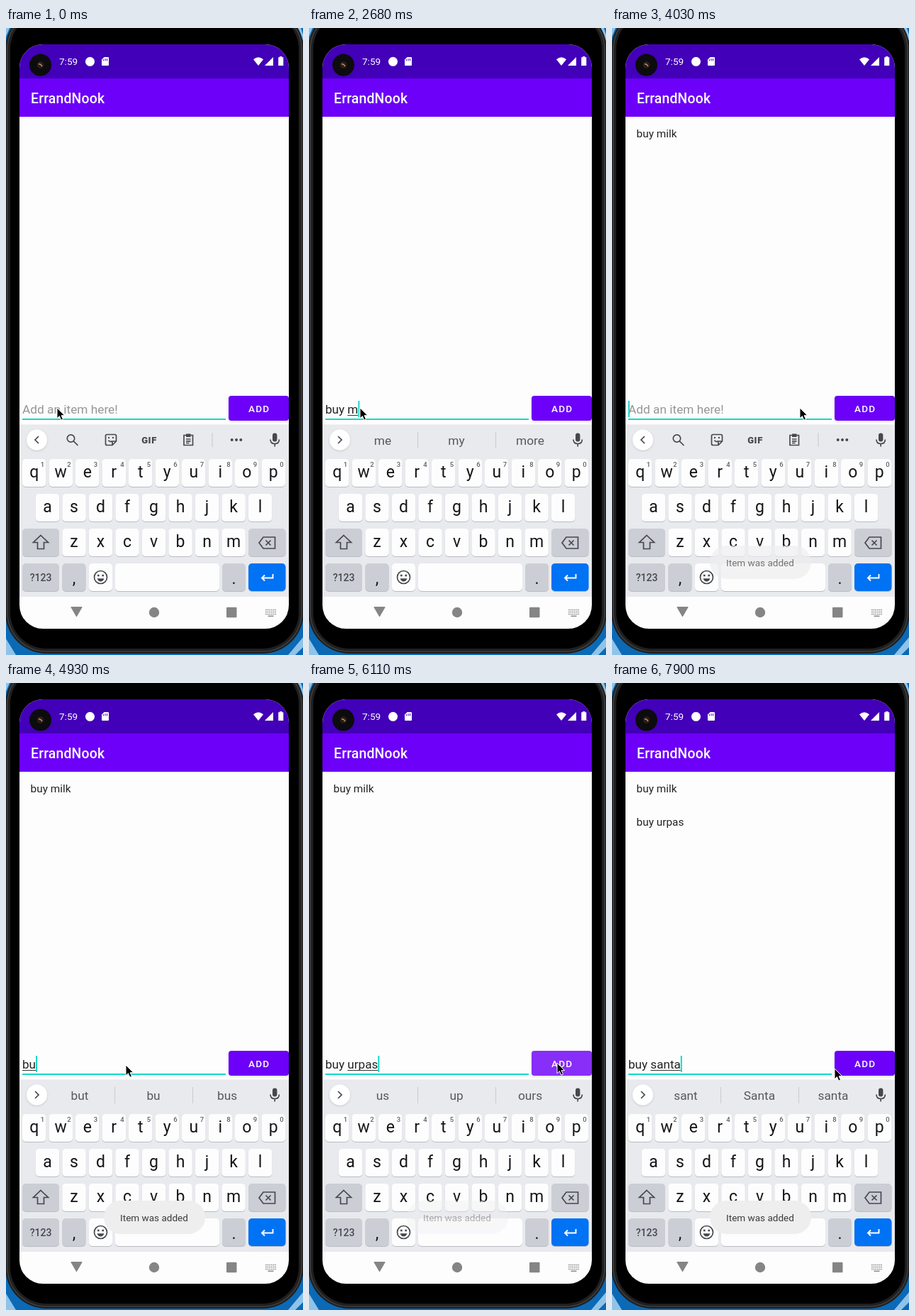
Animation, 419 px wide and 883 px high, one loop 8000 ms. Source, as an HTML page:

```html
<!DOCTYPE html>
<html lang="en">
<head>
<meta charset="utf-8">
<title>To-do list</title>
<style>
  html, body { margin: 0; width: 100%; height: 100%; overflow: hidden; background: #0b69b5; }
  svg { display: block; width: 100%; height: 100%; }
  text { font-family: Roboto, "Noto Sans", sans-serif; white-space: pre; }
  .mid { text-anchor: middle; }
  .title { font-size: 19.35px; font-weight: 500; fill: #fff; }
  .item { font-size: 15.4px; fill: #222; }
  .field { font-size: 17.1px; fill: #222; }
  .hint { font-size: 17.3px; fill: #969696; }
  .small { font-size: 13.55px; }
  .letter { font-size: 23px; fill: #151618; }
  .digit { font-size: 9.5px; font-weight: 500; fill: #5f6165; }
  .word { font-size: 17.3px; fill: #55585c; }
  .line { fill: none; stroke: #45484d; stroke-width: 1.7; }
</style>
</head>
<body>
<svg viewBox="0 0 419 883" preserveAspectRatio="none">
  <defs>
    <clipPath id="screen"><rect x="19" y="23" width="380" height="823" rx="33"/></clipPath>
    <filter id="soft" x="-20%" y="-40%" width="140%" height="190%">
      <feDropShadow dx="0" dy="1" stdDeviation="1.5" flood-opacity=".16"/>
    </filter>
  </defs>

  <!-- desktop and phone body -->
  <rect width="419" height="883" fill="#0b69b5"/>
  <path d="M0 0H5L0 12ZM409 0H416L419 9V18ZM0 860L14 883H0ZM398 883L419 858V872L408 883Z" fill="#8fc3e8"/>
  <rect x="-1" y="-28" width="421" height="909" rx="58" fill="#1f1f1f"/>
  <rect x="2" y="-25" width="415" height="903" rx="55" fill="none" stroke="#3d3d3d" stroke-width="1.6"/>
  <rect x="6" y="-21" width="407" height="895" rx="51" fill="#000"/>

  <g clip-path="url(#screen)">
    <rect x="19" y="23" width="380" height="823" fill="#fdfdfd"/>
    <rect x="19" y="23" width="380" height="48" fill="#4200b8"/>
    <rect x="19" y="71" width="380" height="54" fill="#6c00f8"/>
    <text class="title" x="35" y="105.5" letter-spacing=".2">ErrandNook</text>

    <!-- status bar -->
    <circle cx="48.5" cy="52" r="15.5" fill="#0c0b0d"/>
    <circle cx="48.5" cy="52" r="5" fill="#2a1c17"/>
    <path d="M46 50.5L49 51.5L51 54" stroke="#b48a63" stroke-width="1.6" fill="none"/>
    <g fill="#fff">
      <text class="small" x="75" y="52" fill="#fff">7:59</text>
      <circle cx="118.5" cy="47.3" r="6.5"/>
      <path d="M138.5 41H144Q145 41 145 42V52Q145 53 144 53H136Q135 53 135 52V44.5Z"/>
      <path d="M349 44.2Q356 38.2 363 44.2L356 53Z"/>
      <path d="M377 41V53H365Z"/>
      <path d="M386 40H389.5V41.3H391.3V53H384.2V41.3H386Z"/>
    </g>
    <path d="M137.3 44v2.4M140 43v3.4M142.6 43v3.4" stroke="#4200b8" stroke-width="1"/>

    <!-- list -->
    <text class="item" id="item1" x="34.5" y="154">buy milk</text>
    <text class="item" id="item2" x="34.5" y="200.5">buy urpas</text>

    <!-- input row -->
    <text class="field hint" id="hint" x="23" y="543">Add an item here!</text>
    <text class="field" id="field" x="23" y="543"></text>
    <path id="under" stroke="#333" stroke-width="1"/>
    <rect x="23" y="550" width="287" height="2" fill="#12d8c8"/>
    <rect id="caret" y="525" width="2" height="23" fill="#12d8c8"/>
    <rect x="314" y="518" width="85" height="35" rx="4" fill="#6c00f8" filter="url(#soft)"/>
    <rect id="press" x="314" y="518" width="85" height="35" rx="4" fill="#fff" opacity=".18"/>
    <text class="small" x="342" y="541" font-weight="500" letter-spacing="1.2" fill="#fff">ADD</text>

    <!-- keyboard -->
    <rect x="19" y="558.5" width="380" height="242.5" fill="#e8eaee"/>
    <circle cx="43.5" cy="580" r="14.5" fill="#fff" filter="url(#soft)"/>
    <g id="tools">
      <path class="line" d="M46 575L41 580L46 585"/>
      <circle class="line" cx="91.5" cy="578" r="5.2"/>
      <path class="line" stroke-width="2" d="M95.3 581.8L101.5 588"/>
      <path class="line" d="M142.5 572.5H153.5Q155.5 572.5 155.5 574.5V582L150 587.5H142.5Q140.5 587.5 140.5 585.5V574.5Q140.5 572.5 142.5 572.5ZM150 587V582H155M144.5 580.5Q147 584 149.5 581.5"/>
      <path d="M144 576h2v2h-2zM150 576h2v2h-2z" fill="#45484d"/>
      <text class="mid" x="202" y="584.5" font-size="13" font-weight="900" fill="#45484d" letter-spacing=".6">GIF</text>
      <path class="line" d="M251 573.5H263.5V587.5H251ZM254 579H260.5M254 581.8H260.5M254 584.5H258.5"/>
      <path d="M254 571.5H260.5V576H254Z" fill="#45484d"/>
      <path d="M291 570V590" stroke="#c6c8cc"/>
      <path d="M318.7 580h.01M325 580h.01M331.3 580h.01" stroke="#45484d" stroke-width="4" stroke-linecap="round"/>
    </g>
    <g id="strip">
      <path class="line" d="M41 575L46 580L41 585"/>
      <path d="M153.5 569V592M263.5 569V592" stroke="#c9cbcf"/>
      <text class="word mid" x="104" y="586.5"></text>
      <text class="word mid" x="208" y="586.5"></text>
      <text class="word mid" x="312" y="586.5"></text>
      <g id="glass">
        <path d="M202.5 571.5H213.5L212.8 590H203.2Z" fill="#f4f4f5" stroke="#d3d5d8"/>
        <path d="M203 576H213" stroke="#d3d5d8"/>
      </g>
    </g>
    <rect x="376" y="570.5" width="6.4" height="12" rx="3.2" fill="#45484d"/>
    <path class="line" d="M373 579.5Q373 585.5 379.2 585.5Q385.4 585.5 385.4 579.5M379.2 585.5V589.5"/>

    <g id="keys"></g>
    <path class="line" d="M49 714.5L59.5 724.5H53.5V733.5H44.5V724.5H38.5Z"/>
    <path class="line" d="M363 717H379.5V733H363L357 725ZM366.5 721.5L373.5 728.5M373.5 721.5L366.5 728.5"/>
    <text class="mid" x="49" y="779" font-size="14" font-weight="500" fill="#45484d">?123</text>
    <g>
      <circle class="line" cx="133.5" cy="773.5" r="9"/>
      <path d="M129 769.7h2.6v2.6H129zM135.4 769.7h2.6v2.6h-2.6z" fill="#45484d"/>
      <path d="M128.5 775.3H138.5Q137 779.5 133.5 779.5Q130 779.5 128.5 775.3Z" fill="#45484d"/>
    </g>
    <path d="M376.5 769V774.5H361M365 770.5L361 774.5L365 778.5" fill="none" stroke="#fff" stroke-width="1.9"/>

    <!-- navigation bar -->
    <g fill="#858585">
      <path d="M92 815H107Q108 815 107.3 816.2L100.2 828.4Q99.5 829.5 98.8 828.4L91.7 816.2Q91 815 92 815Z"/>
      <circle cx="209" cy="823" r="7.2"/>
      <rect x="311" y="815.8" width="14.5" height="14.5" rx="1"/>
    </g>
    <path d="M366 819.5H381M366 822.5H381M366 825.5H381" stroke="#8c8c8c" stroke-width="1.7" stroke-dasharray="1.7 1"/>
    <path d="M369.5 828.3H377.5" stroke="#8c8c8c" stroke-width="1.4"/>

    <g id="toast">
      <rect x="138" y="729" width="143" height="47" rx="23.5" fill="#eeeeef"/>
      <text class="small mid" x="209" y="758" fill="#3b3b3b">Item was added</text>
    </g>
  </g>

  <path id="mouse" d="M0 0V14.8L3.4 11.6L5.8 17.2L8.5 16.1L6.1 10.7H10.7Z" fill="#000" stroke="#fff" stroke-width="1"/>
</svg>

<script>
const $ = id => document.getElementById(id);
const LOOP = 8000;

// Each track holds [start in ms, values...]; a value stays until the next start.
const typing = [
  [0, ''],
  [2090, 'b', 'be', 'b', 'but'],
  [2240, 'bu', 'but', 'bu', 'bus'],
  [2390, 'buy', 'but', 'buy', 'buying'],
  [2530, 'buy ', 'a', 'it', 'the'],
  [2680, 'buy m', 'me', 'my', 'more'],
  [2830, 'buy mi', 'mine', 'mi', 'milk'],
  [2980, 'buy mil', 'mil', 'milk', 'mile'],
  [3130, 'buy milk', 'milk', '', 'milkshake'],
  [3880, ''],
  [4930, 'bu', 'but', 'bu', 'bus'],
  [5080, 'buy ', 'a', 'it', 'the'],
  [5220, 'buy u', 'us', 'up', 'u'],
  [5370, 'buy urp', 'ur', 'it', 'our'],
  [5520, 'buy urpa', 'ur', 'up', 'our'],
  [5670, 'buy urpas', 'us', 'up', 'ours'],
  [6260, ''],
  [7150, 'b', 'be', 'b', 'but'],
  [7300, 'buy', 'but', 'buy', 'buying'],
  [7450, 'buy s', 'some', 's', 'so'],
  [7600, 'buy san', 'san', 'sand', 'sans'],
  [7750, 'buy santa', 'sant', 'Santa', 'santa']
];
const mouse = [
  [0, 72, 535], [3280, 214, 537], [3430, 323.5, 538], [3580, 346, 535],
  [3880, 320, 535], [4030, 265, 535], [4180, 241, 536], [4330, 169, 538],
  [5670, 255, 538], [5810, 345, 537], [5960, 350, 535], [6260, 344, 534],
  [6400, 310, 533], [6550, 262, 533], [6700, 226, 533],
  [7750, 262, 537], [7900, 314, 543]
];
const caret = [
  [0, 0], [300, 1], [750, 0], [1350, 1], [1800, 0], [2090, 1],
  [4330, 0], [4780, 1], [6700, 0], [7150, 1]
];
const toast = [
  [0, 0], [4030, .7], [4180, .95], [4330, 1],
  [6110, .4], [6260, 0], [6400, .6], [6550, .95], [6700, 1]
];
const press = [[0, 0], [3730, 1], [4030, 0], [6110, 1], [6400, 0]];

const at = (track, t) => track.findLast(step => step[0] <= t).slice(1);
const show = (id, on) => { $(id).style.display = on ? '' : 'none'; };

function buildKeys() {
  const white = '#fdfdfe', grey = '#cbced4';
  let out = '';
  const key = (x, y, w, fill, label = '', digit = '') => {
    const box = (dy, color) =>
      `<rect x="${x}" y="${y + dy}" width="${w}" height="39" rx="5" fill="${color}"/>`;
    out += box(1, '#b9bcc2') + box(0, fill);
    out += `<text class="letter mid" x="${x + w / 2}" y="${y + 26}">${label}</text>`;
    if (digit) out += `<text class="digit mid" x="${x + 28.5}" y="${y + 11}">${digit}</text>`;
  };
  const row = (letters, x, y, digits = '') => [...letters].forEach((c, i) =>
    key(x + i * 37.5, y, 33.5, white, c, digits[i]));
  row('qwertyuiop', 23, 607, '1234567890');
  row('asdfghjkl', 41.8, 656);
  row('zxcvbnm', 79.3, 705);
  key(23, 705, 52, grey);
  key(342, 705, 52.5, grey);
  key(23, 754, 52, grey);
  key(79.5, 754, 33, grey, '<tspan dy="3">,</tspan>');
  key(117, 754, 33, white);
  key(154, 754, 147, white);
  key(305, 754, 33, grey, '<tspan dy="3">.</tspan>');
  key(342, 754, 52.5, '#0072f4');
  $('keys').innerHTML = out;
}

const words = document.querySelectorAll('.word');
const field = $('field');
let shown = null;

function setText(text, tips) {
  if (text === shown) return;
  shown = text;
  field.textContent = text;
  show('hint', !text);
  show('tools', !text);
  show('strip', text);
  show('glass', text === 'buy milk');
  words.forEach((el, i) => { el.textContent = tips[i] || ''; });

  const end = 23 + (text ? field.getComputedTextLength() : 0);
  const first = text.lastIndexOf(' ') + 1;
  const start = first && first < text.length
    ? 23 + field.getSubStringLength(0, first) : 23;
  $('under').setAttribute('d', first < text.length ? `M${start} 545.5H${end}` : '');
  $('caret').setAttribute('x', text ? end : 22.8);
}

function draw(now) {
  const t = now % LOOP;
  const [text, ...tips] = at(typing, t);
  setText(text, tips);
  const [x, y] = at(mouse, t);
  $('mouse').setAttribute('transform', `translate(${x} ${y})`);
  show('caret', at(caret, t)[0]);
  show('press', at(press, t)[0]);
  $('toast').style.opacity = at(toast, t)[0];
  show('item1', t >= 3880);
  show('item2', t >= 6260);
}

buildKeys();
const began = performance.now();
function tick() {
  draw(performance.now() - began);
  requestAnimationFrame(tick);
}
tick();
</script>
</body>
</html>
```
